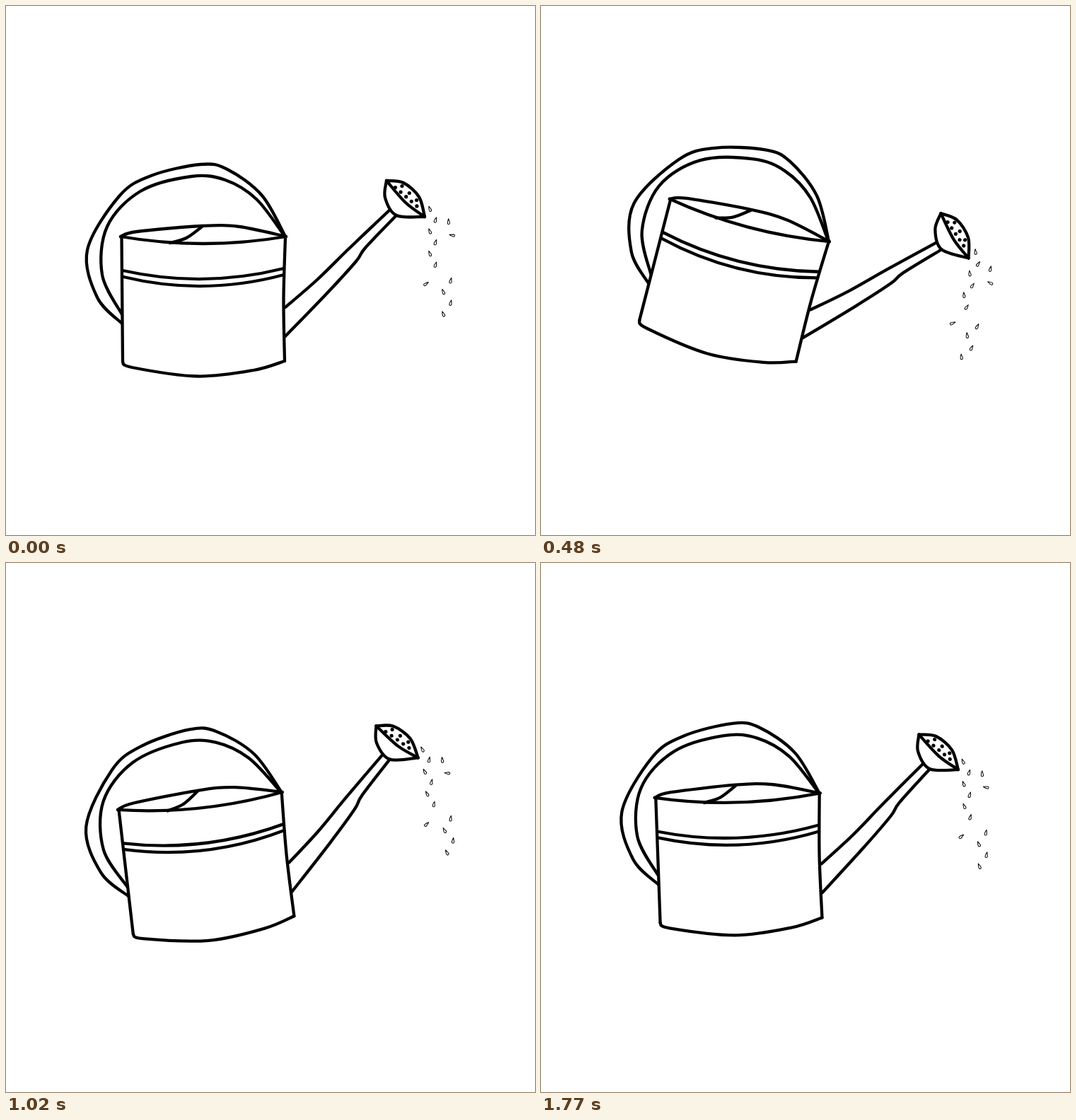
Animation of 748x748 px, one loop 1.8 s. Source, as an HTML page with a canvas:

```html
<!DOCTYPE html>
<html lang="en">
<head>
<meta charset="utf-8">
<title>Watering can</title>
<style>
html, body { margin: 0; width: 100%; height: 100%; overflow: hidden; background: #fff; }
canvas { display: block; width: 100vw; height: 100vh; }
</style>
</head>
<body>
<canvas id="stage" width="748" height="748"></canvas>
<script>
const ctx = document.getElementById('stage').getContext('2d');
const SIZE = 748, LOOP = 1800, STEP = 30, PIVOT = 375;
const rad = deg => deg * Math.PI / 180;

// Smooth curve through a few key points, "x,y x,y ..."
function curve(text) {
  const pts = text.split(' ').map(s => s.split(',').map(Number));
  const at = i => pts[Math.max(0, Math.min(pts.length - 1, i))];
  const path = new Path2D();
  path.moveTo(...pts[0]);
  for (let i = 0; i < pts.length - 1; i++) {
    const [a, b, c, d] = [at(i - 1), at(i), at(i + 1), at(i + 2)];
    path.bezierCurveTo(
      b[0] + (c[0] - a[0]) / 6, b[1] + (c[1] - a[1]) / 6,
      c[0] - (d[0] - b[0]) / 6, c[1] - (d[1] - b[1]) / 6, c[0], c[1]);
  }
  return path;
}

// Line from one side of the can to the other, hanging down by sag
function bow(x1, y1, x2, y2, sag) {
  const path = new Path2D();
  path.moveTo(x1, y1);
  path.quadraticCurveTo((x1 + x2) / 2, (y1 + y2) / 2 + 2 * sag, x2, y2);
  return path;
}

const handle = [
  curve('395,326 362,268 313,231 275,224 205,240 160,269 115,345 129,412 164,449'),
  curve('393,324 354,273 310,246 262,241 190,262 143,312 136,380 164,436')
];
const body = [
  curve('163.5,326 165,503'),
  curve('395,327 392.5,415 394,502'),
  curve('165,503 178,511 270,523.5 350,515 394,502'),
  bow(165, 374, 393, 371, 13.5),
  bow(166, 383, 393, 380, 14.5)
];
const lid = [
  curve('162,326 185,319 277,311 330,312 396,326'),
  bow(162, 326, 396, 326, 10),
  curve('277,312 255,328 232,335')
];
const spout = [
  curve('395,426 440,387 485,343 543,288'),
  curve('395,467 455,405 495,361 508,342 552,296')
];
const rose = [
  curve('538,247 562,250 584,270 592,298'),
  curve('538,247 565,278 592,298'),
  curve('538,247 536,271 552,296 592,298')
];
const outline = [...handle, ...body, ...lid, ...spout, ...rose];
const drop = new Path2D('M-1.3 -4L2 1.3Q2.3 3.8 -.4 3.5Q-2 2 -1.3 -4Z');

function holes(x, y, dx, dy, count) {
  for (let i = 0; i < count; i++) {
    ctx.beginPath();
    ctx.arc(x + i * dx, y + i * dy, 2.6, 0, 2 * Math.PI);
    ctx.fill();
  }
}

// Falling drops that alternate between two columns and two tilts
function drops(xs, tilts, y, gap, count) {
  for (let i = 0; i < count; i++) {
    ctx.save();
    ctx.translate(xs[i % 2], y + i * gap);
    ctx.rotate(rad(tilts[i % 2]));
    ctx.stroke(drop);
    ctx.restore();
  }
}

function drawCan() {
  ctx.lineWidth = 4.3;
  outline.forEach(path => ctx.stroke(path));
  holes(550.5, 256.5, 7.6, 6.6, 5);
  holes(560, 254.5, 10.3, 10, 3);
  ctx.lineWidth = 1;
  drops([599.5, 607.5], [-5, 35], 287, 15.8, 6);
  drops([626, 631], [15, -60], 305, 19, 2);
  drops([594], [70], 393, 0, 1);
  drops([629, 618.5], [30, -5], 388.5, 15.7, 4);
}

function frame() {
  const t = Math.floor(performance.now() % LOOP / STEP) * STEP;
  ctx.clearRect(0, 0, SIZE, SIZE);
  ctx.save();
  ctx.translate(PIVOT, PIVOT);
  ctx.rotate(rad(15) * Math.sin(2 * Math.PI * t / LOOP));
  ctx.translate(-PIVOT, -PIVOT);
  ctx.lineCap = ctx.lineJoin = 'round';
  drawCan();
  ctx.restore();
  requestAnimationFrame(frame);
}
frame();
</script>
</body>
</html>
```
